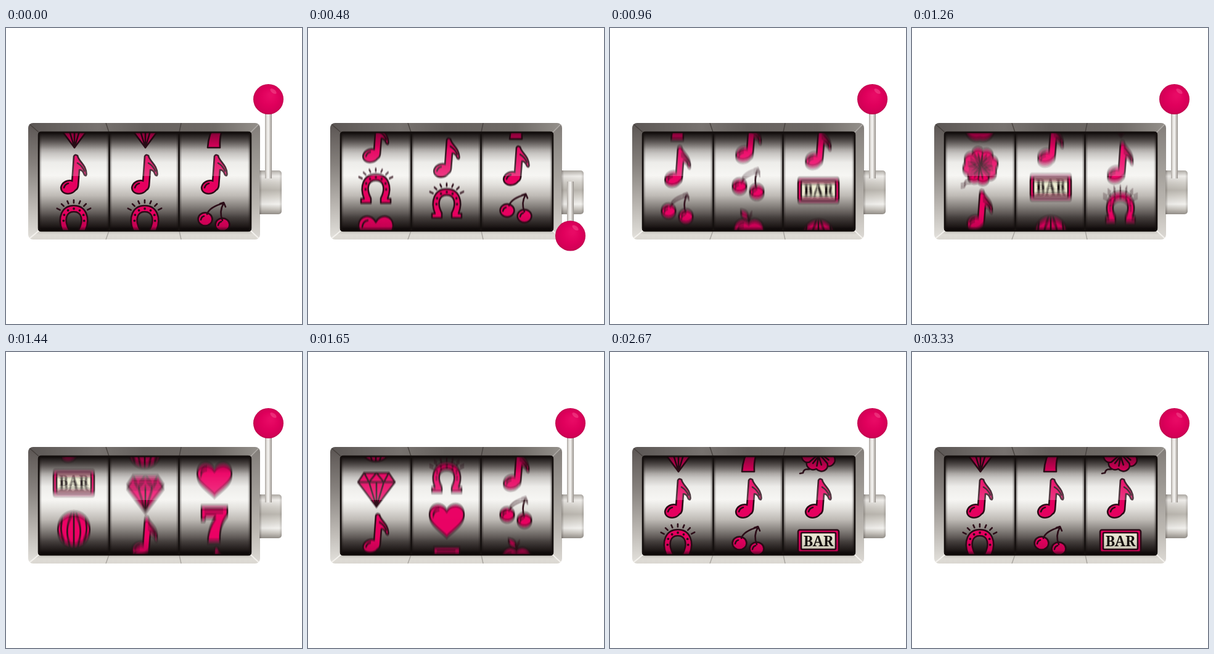
An HTML page with a canvas for the animation above (3.42 s loop, 480 by 480 pixels).

```html
<!DOCTYPE html>
<html>
<head>
<meta charset="utf-8">
<style>
html, body { margin: 0; width: 100%; height: 100%; overflow: hidden; background: #fff; }
canvas { display: block; width: 480px; height: 480px; }
</style>
</head>
<body>
<canvas id="stage" width="480" height="480"></canvas>
<script>
const LOOP = 3420, STEP = 30, LAST = 3330;
const PINK = '#e5005f', INK = '#2b0c17';
const PITCH = 72, CENTER = 238;
const WIN = { x: 52, y: 168, w: 346, h: 162 };
const ctx = document.getElementById('stage').getContext('2d');

function layer() {
  const c = document.createElement('canvas');
  c.width = c.height = 480;
  return c.getContext('2d');
}

function linear(g, x0, y0, x1, y1, stops) {
  const grad = g.createLinearGradient(x0, y0, x1, y1);
  stops.forEach(([at, color]) => grad.addColorStop(at, color));
  return grad;
}

function rounded(g, x, y, w, h, r) {
  g.beginPath();
  g.roundRect(x, y, w, h, r);
}

function shape(g, d, fill = PINK) {
  const p = new Path2D(d);
  if (fill) { g.fillStyle = fill; g.fill(p); }
  g.stroke(p);
}

function disc(g, x, y, rx, ry = rx, turn = 0) {
  g.beginPath();
  g.ellipse(x, y, rx, ry, turn, 0, 7);
  g.fillStyle = PINK;
  g.fill();
  g.stroke();
}

// Each symbol is drawn around its own centre.
const symbols = {
  note(g) {
    disc(g, -8, 20, 13, 10.5, -0.3);
    shape(g, 'M-3 12L0 -30Q2 -34 6 -31C8 -21 20 -17 20.5 -1Q20 3 17 0C15 -6 12 -8 9 -8L7 18Q6 24 2 25Q-3 22 -3 12Z');
    g.fillStyle = PINK;
    g.beginPath();
    g.ellipse(-7.5, 20, 11.5, 9, -0.3, 0, 7);
    g.fill();
    shape(g, 'M-16 21Q-14 15 -9 14M6 -19Q14 -14 17 -6', null);
  },
  horseshoe(g) {
    shape(g, 'M-24 25V18H-19C-27 -2 -20 -22 0 -22C20 -22 27 -2 19 18H24V25H8V17C16 2 13 -12 0 -12C-13 -12 -16 2 -8 17V25Z');
    g.fillStyle = INK;
    for (let i = 0; i < 7; i++) {
      const a = Math.PI * (0.94 + i * 0.187);
      g.beginPath();
      g.arc(Math.cos(a) * 17, Math.sin(a) * 16.5 - 0.5, 1.9, 0, 7);
      g.fill();
    }
    for (let i = 0; i < 7; i++) {
      const a = Math.PI * (1.19 + i * 0.103);
      g.beginPath();
      g.moveTo(Math.cos(a) * 27, Math.sin(a) * 26.5);
      g.lineTo(Math.cos(a) * 33, Math.sin(a) * 31);
      g.stroke();
    }
  },
  heart(g) {
    shape(g, 'M0 26C-9 16 -28 6 -28 -10C-28 -28 -7 -31 0 -16C7 -31 28 -28 28 -10C28 6 9 16 0 26Z');
    shape(g, 'M-22 -8Q-21 -18 -13 -19', null);
  },
  seven(g) {
    shape(g, 'M-21 -28H21V-15C11 -2 8 10 9 28H-11C-10 12 -6 0 2 -12H-14L-16 -7H-21Z');
    shape(g, 'M-15 -22H13', null);
  },
  cherry(g) {
    disc(g, -15, 0, 11.5, 10.5);
    disc(g, 13, 9, 11.5, 10.5);
    shape(g, 'M-12 -8Q-8 -20 15 -26Q7 -12 13 2M9 -25L15 -27L18 -20M-22 1Q-21 -4 -17 -5M6 10Q7 5 11 4', null);
  },
  apple(g) {
    shape(g, 'M0 -13C10 -21 25 -15 25 3C25 20 13 31 0 27C-13 31 -25 20 -25 3C-25 -15 -10 -21 0 -13Z');
    shape(g, 'M0 -12Q0 -22 5 -28', null);
    shape(g, 'M0 -20Q-13 -20 -13 -32Q-1 -31 0 -20Z');
    shape(g, 'M-18 2Q-17 -8 -9 -9', null);
  },
  clover(g) {
    shape(g, 'M1 0Q-8 27 -18 24Q-24 24 -25 30L-30 31', null);
    for (let i = 0; i < 4; i++) {
      g.save();
      g.translate(1, -1);
      g.rotate(i * Math.PI / 2 + 0.18);
      shape(g, 'M0 0L-16 -13C-21 -22 -10 -32 0 -25C10 -32 21 -22 16 -13Z');
      shape(g, 'M0 -3V-20M0 -4L-7 -17M0 -4L7 -17', null);
      g.restore();
    }
  },
  bar(g) {
    g.fillStyle = PINK;
    rounded(g, -33, -21.5, 66, 36, 3);
    g.fill();
    g.stroke();
    g.fillStyle = '#e8e5d2';
    rounded(g, -28, -17, 56, 27, 2);
    g.fill();
    g.stroke();
    g.fillStyle = '#17100f';
    g.font = 'bold 23px "Noto Serif", serif';
    g.textAlign = 'center';
    g.textBaseline = 'alphabetic';
    g.fillText('BAR', 0, 5);
  },
  beetle(g) {
    disc(g, 0, 0, 26);
    shape(g, 'M0 -26V26M-3 -25Q-17 0 -6 25M3 -25Q17 0 6 25M-19 -15Q-24 2 -16 18M19 -15Q24 2 16 18', null);
  },
  diamond(g) {
    shape(g, 'M-19 -27H21L31 -12L1 28L-29 -12Z');
    shape(g, 'M-29 -12H31M-19 -27L-11 -12L1 28L13 -12L21 -27M-11 -12L1 -27L13 -12M1 -12V26', null);
  }
};
const strip = ['diamond', 'note', 'horseshoe', 'heart', 'seven', 'note',
  'cherry', 'apple', 'clover', 'note', 'bar', 'beetle'];
const TURN = strip.length * PITCH;

// Keys are [time, upward scroll].
const reels = [
  { x: 110, keys: [[210, 0], [480, 51], [960, 301], [1260, 517], [1650, 807], [1950, 864]] },
  { x: 225, keys: [[290, 0], [480, 27], [960, 341], [1260, 624], [1650, 972], [2060, 1152]] },
  { x: 338, keys: [[350, 288], [480, 302], [960, 619], [1260, 884], [1650, 1198], [2070, 1419], [2220, 1440]] }
];

// Monotone cubic through the keys, at rest at both ends.
function scrollAt(keys, t) {
  const n = keys.length - 1;
  if (t <= keys[0][0]) return keys[0][1];
  if (t >= keys[n][0]) return keys[n][1];
  const rate = i => (keys[i + 1][1] - keys[i][1]) / (keys[i + 1][0] - keys[i][0]);
  const slope = i => i === 0 || i === n ? 0 : 2 / (1 / rate(i - 1) + 1 / rate(i));
  let i = 0;
  while (t > keys[i + 1][0]) i++;
  const [t0, a] = keys[i], [t1, b] = keys[i + 1];
  const d = t1 - t0, u = (t - t0) / d, e = u * u * (3 - 2 * u);
  return a + (b - a) * e + d * u * (1 - u) * (slope(i) * (1 - u) - slope(i + 1) * u);
}

function drawStrip(g, x, scroll) {
  strip.forEach((name, i) => {
    let dy = ((PITCH * (i - 1) - scroll) % TURN + TURN) % TURN;
    if (dy > TURN / 2) dy -= TURN;
    if (Math.abs(dy) > 130) return;
    g.save();
    g.translate(x, CENTER + dy);
    symbols[name](g);
    g.restore();
  });
}

const one = layer(), mix = layer();
one.strokeStyle = INK;
one.lineWidth = 2.6;
one.lineJoin = one.lineCap = 'round';

function drawReel({ x, keys }, t) {
  const shutter = 6;
  const travel = Math.abs(scrollAt(keys, t + shutter) - scrollAt(keys, t - shutter));
  const count = travel < 0.3 ? 1 : Math.min(9, 2 + Math.ceil(travel / 1.5));
  mix.clearRect(0, 0, 480, 480);
  mix.globalCompositeOperation = 'lighter';
  mix.globalAlpha = 1 / count;
  for (let i = 0; i < count; i++) {
    const shift = count === 1 ? 0 : (2 * i / (count - 1) - 1) * shutter;
    one.clearRect(0, 0, 480, 480);
    drawStrip(one, x, scrollAt(keys, t + shift));
    mix.drawImage(one.canvas, 0, 0);
  }
  ctx.drawImage(mix.canvas, 0, 0);
}

function polygon(points, fill) {
  ctx.beginPath();
  points.forEach(([x, y]) => ctx.lineTo(x, y));
  ctx.closePath();
  ctx.fillStyle = fill;
  ctx.fill();
}

function line(x0, y0, x1, y1, color, width = 1) {
  ctx.beginPath();
  ctx.moveTo(x0, y0);
  ctx.lineTo(x1, y1);
  ctx.strokeStyle = color;
  ctx.lineWidth = width;
  ctx.stroke();
}

function drawCase() {
  const l = 36, r = 412, t = 154, b = 343, L = 53, R = 397, T = 169, B = 329;
  ctx.save();
  rounded(ctx, l, t, r - l, b - t, 8);
  ctx.clip();
  polygon([[l, t], [r, t], [R, T], [L, T]], linear(ctx, l, 0, r, 0,
    [[0, '#5b5654'], [0.3, '#77726f'], [0.5, '#66615e'], [0.8, '#6f6a66'], [1, '#95918c']]));
  polygon([[l, t], [L, T], [L, B], [l, b]], linear(ctx, 0, t, 0, b,
    [[0, '#5a5452'], [0.35, '#85807c'], [0.7, '#b9b5b0'], [1, '#e4e2dd']]));
  polygon([[r, t], [r, b], [R, B], [R, T]], linear(ctx, 0, t, 0, b,
    [[0, '#817c78'], [0.3, '#9a9691'], [0.7, '#bbb7b1'], [1, '#dddad5']]));
  polygon([[l, b], [L, B], [R, B], [r, b]], linear(ctx, 0, B, 0, b,
    [[0, '#c6c3bd'], [0.45, '#dedbd5'], [1, '#dad7d1']]));
  line(l, t, L, T, '#453f3c', 1.5);
  line(r, t, R, T, '#b0aca8', 1.5);
  line(l, b, L, B, '#f4f2ee', 2);
  line(r, b, R, B, '#f4f2ee', 2);
  [[162, 167], [284, 281]].forEach(([out, inn]) => {
    line(out, t, inn, T, '#4a4542', 1.5);
    line(inn, B, out, b, '#aaa6a1', 1.5);
  });
  ctx.restore();
}

function drawWindow(t) {
  const { x, y, w, h } = WIN;
  ctx.save();
  rounded(ctx, x, y, w, h, 5);
  ctx.clip();
  ctx.fillStyle = linear(ctx, 0, y, 0, y + h, [
    [0, '#15100f'], [0.06, '#4d4745'], [0.13, '#87827f'], [0.22, '#c4c1be'], [0.31, '#ebeae7'],
    [0.45, '#f5f4f1'], [0.53, '#e2e0dc'], [0.64, '#bfbbb6'], [0.75, '#85807c'],
    [0.86, '#484240'], [0.95, '#211b1a'], [1, '#0d0908']]);
  ctx.fillRect(x, y, w, h);
  reels.forEach(reel => drawReel(reel, t));

  ctx.fillStyle = linear(ctx, 0, 190, 0, 240,
    [[0, 'rgba(255,255,255,0)'], [1, 'rgba(255,255,255,.22)']]);
  ctx.fillRect(x, 190, w, 50);
  ctx.fillStyle = linear(ctx, 0, y, 0, y + h, [
    [0, 'rgba(8,4,4,.85)'], [0.03, 'rgba(8,4,4,.38)'], [0.18, 'rgba(8,4,4,0)'],
    [0.82, 'rgba(8,4,4,0)'], [0.95, 'rgba(8,4,4,.15)'], [1, 'rgba(8,4,4,.85)']]);
  ctx.fillRect(x, y, w, h);

  [53, 167.5, 280.5, 397].forEach(edge => {
    ctx.fillStyle = linear(ctx, edge - 5, 0, edge + 5, 0,
      [[0, 'rgba(20,14,13,0)'], [0.5, 'rgba(20,14,13,.55)'], [1, 'rgba(20,14,13,0)']]);
    ctx.fillRect(edge - 5, y, 10, h);
    line(edge, y, edge, y + h, '#15100f', 2.5);
  });
  ctx.restore();
  rounded(ctx, x + 1, y + 1, w - 2, h - 2, 4);
  ctx.strokeStyle = '#15100f';
  ctx.lineWidth = 2.5;
  ctx.stroke();
}

function smooth(t, from, to) {
  const u = Math.min(1, Math.max(0, (t - from) / (to - from)));
  return u * u * (3 - 2 * u);
}

function drawLever(t) {
  const ballX = 425.5;
  const ballY = 115.5 + 221.5 * (smooth(t, 0, 480) - smooth(t, 540, 960));
  ctx.fillStyle = linear(ctx, 0, 231, 0, 302, [
    [0, '#aeaaa4'], [0.13, '#efedea'], [0.28, '#d3d0ca'], [0.45, '#bbb7b0'],
    [0.6, '#d5d2cc'], [0.77, '#f2f1ee'], [0.89, '#c6c2bc'], [1, '#938e88']]);
  rounded(ctx, 411, 231, 36, 71, [0, 5, 5, 0]);
  ctx.fill();
  ctx.fillStyle = linear(ctx, 411, 0, 447, 0, [
    [0, 'rgba(70,64,60,.4)'], [0.12, 'rgba(70,64,60,.05)'],
    [0.88, 'rgba(70,64,60,0)'], [1, 'rgba(70,64,60,.2)']]);
  ctx.fill();

  const pivot = ballY < 246 ? 244 : 249;
  ctx.fillStyle = linear(ctx, 420, 0, 431, 0, [
    [0, '#a5a09b'], [0.2, '#d8d5d0'], [0.48, '#f8f7f5'], [0.75, '#cbc7c2'], [1, '#928d88']]);
  ctx.fillRect(420, Math.min(pivot, ballY), 11, Math.abs(ballY - pivot));

  const glow = ctx.createRadialGradient(ballX + 4, ballY - 7, 3, ballX, ballY, 25);
  glow.addColorStop(0, '#e80a65');
  glow.addColorStop(0.5, '#e0005c');
  glow.addColorStop(0.88, '#d30056');
  glow.addColorStop(1, '#b80049');
  ctx.fillStyle = glow;
  ctx.beginPath();
  ctx.arc(ballX, ballY, 24.5, 0, 7);
  ctx.fill();
  ctx.fillStyle = 'rgba(255,120,170,.35)';
  ctx.beginPath();
  ctx.ellipse(ballX + 8, ballY - 13, 6, 3, 0.65, 0, 7);
  ctx.fill();
}

function draw(now) {
  const t = Math.min(LAST, Math.floor((now % LOOP) / STEP) * STEP);
  ctx.fillStyle = '#fff';
  ctx.fillRect(0, 0, 480, 480);
  drawCase();
  drawWindow(t);
  drawLever(t);
}

const start = performance.now();
function tick() {
  draw(performance.now() - start);
  requestAnimationFrame(tick);
}
tick();
</script>
</body>
</html>
```
